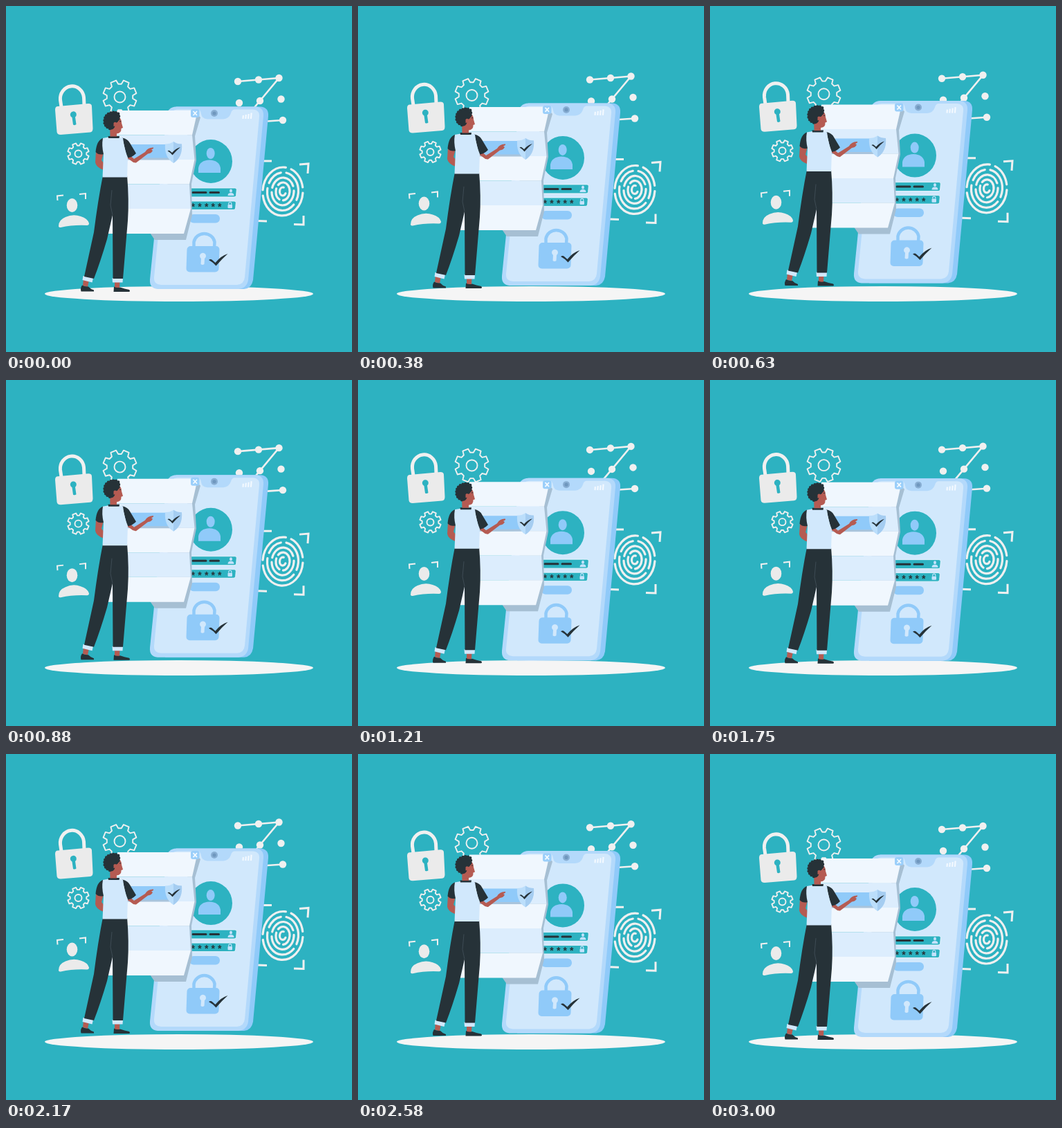
An HTML page that plays this animation: 500x500 px, repeating every 3.04 s.

```html
<!DOCTYPE html>
<html lang="en">
<head>
<meta charset="utf-8">
<title>Phone security</title>
<style>
  html, body { margin: 0; height: 100%; overflow: hidden; background: #2db2c1; }
  svg { display: block; width: 100vw; height: 100vh; }
  .line { fill: none; stroke: #f0f0f0; }
  .pale { fill: #d1e8fc; }
  .blue { fill: #90caf9; }
  .teal { fill: #2db2c1; }
  .dark { fill: #263238; }
  .skin { fill: #b55b52; }
</style>
</head>
<body>
<svg viewBox="0 0 500 500">
  <ellipse cx="250" cy="416" rx="194" ry="11" fill="#f5f5f5"/>

  <g id="icons" fill="#ebebeb">
    <!-- padlock -->
    <path class="line" stroke="#ebebeb" stroke-width="5" d="M80 146L78.500 136A17 18 0 0 1 112.500 132L113 143"/>
    <path d="M75 145L119 141q5 0 5 4L125.500 177q0 5-4 5.500L79 186q-5 0-5.500-4L71 150q0-5 4-5z"/>
    <path class="teal" d="M95.500 161a4.500 4.500 0 1 1 4.500-.5l1.500 10.500q-2 2-4.500.5z"/>
    <!-- gears -->
    <g id="gears" class="line" stroke-width="1.900" stroke-linejoin="round"></g>
    <!-- face scan -->
    <ellipse cx="95.500" cy="288" rx="7.800" ry="10"/>
    <path d="M76 318q0-9 10-13q11-5 22-1q10 3 12 10q0 3-3 3q-20-1-38 3q-3 0-3-2z"/>
    <path class="line" stroke-width="2" d="M74.500 281L74 274.500L83 273.500M106 272L115 271V279"/>
    <!-- network -->
    <path class="line" stroke-width="2.600" d="M335 109L365 106.500L394.500 104L367 137L340 169M400 165L370 167"/>
    <g id="nodes" fill="#f0f0f0"></g>
    <!-- fingerprint -->
    <g id="print" class="line" stroke-width="3.200" stroke-linecap="round" transform="rotate(4 400 268)"></g>
    <path class="line" stroke-width="3" d="M372 224H384M424 229L437 228L436 242M430 303V316L416 315.500M364 310.500L377 311"/>
  </g>

  <g id="front">
    <!-- phone -->
    <path class="blue" d="M246 145.500H367Q380 146 379 159L357 396Q355 408 344 409H230Z"/>
    <path fill="#b3d9fb" d="M246 145.500H360Q373 146 372 159L350 396Q348 408 336 409H219Q207 408 208 395L232 158Q234 146 246 145.500Z"/>
    <path class="pale" d="M248 149.500H278Q281 150 282 156Q283 163 291 163.500H314Q322 163 325 155Q326 150 330 149.500H356Q367 150 366 160L345 392Q344 402 334 403H224Q213 402 214 392L237 160Q238 150 248 149.500Z"/>
    <circle cx="301" cy="155" r="5" fill="#88aed3"/>
    <circle cx="301" cy="155" r="2.600" fill="#6f97be"/>
    <path stroke="#f3f9ff" stroke-width="2.200" d="M342.500 163l.4-5M346.300 163l.5-6M350.100 163l.6-7M353.900 163l.7-8.500"/>

    <ellipse class="teal" cx="296" cy="224.500" rx="31" ry="31.500"/>
    <g class="blue">
      <ellipse cx="295.700" cy="213" rx="6" ry="8"/>
      <path d="M278 241v-7q2-11 16-11.500q14 .5 16 11.500v7z"/>
      <rect x="265" y="301" width="44" height="12.500" rx="6"/>
      <rect x="261" y="347" width="47" height="37.500" rx="5" transform="skewX(-2)" transform-origin="284 366"/>
    </g>
    <path fill="none" stroke="#90caf9" stroke-width="4.500" d="M271.500 349V341A15.300 15 0 0 1 301.500 341L301 349"/>
    <path class="pale" d="M282 365a4.500 4.500 0 1 1 5 0l-.5 8q-2.500 2-5 0z"/>
    <path class="dark" d="M293 367q3-2 5 0l4.500 4q8-10 18-13q-9 8-17 17.500q-4-5-10.500-8.500z"/>

    <g stroke="#eef7ff" stroke-width=".9" class="teal">
      <path d="M262 263H331q2.500 0 2.300 2.500l-.6 8q-.2 2.500-2.700 2.500H262z"/>
      <path d="M261 282H330q2.500 0 2.300 2.500l-.6 7.500q-.2 2.500-2.700 2.500H261z"/>
    </g>
    <path stroke="#263238" stroke-width="3" stroke-linecap="round" d="M270 269.500H289M295 269.500H307.500"/>
    <text class="dark" x="267.500 277.200 286.900 296.500 306" y="295" font-family="Liberation Sans, Arial, sans-serif" font-size="14" font-weight="700">*****</text>
    <g fill="#c4e2fc">
      <ellipse cx="325" cy="267" rx="2" ry="2.500"/>
      <path d="M320.500 274q0-4 4.500-4t4.500 4z"/>
      <rect x="320.500" y="287" width="6.500" height="5.200" rx="1"/>
      <path fill="none" stroke="#c4e2fc" stroke-width="1.200" d="M321.800 287v-1.500a2 2 0 0 1 4 0V287"/>
    </g>

    <!-- folded sheet -->
    <path fill="#a6bfd3" d="M275 155L281 161L273 188L275 223L268 257L269 302L260 338H215L206 325Z"/>
    <g id="sheet"></g>
    <path fill="#a9c4dc" d="M172 203H238V222.500H172z"/>
    <path class="blue" d="M172 200H240V219.500H172z"/>
    <path fill="#bbdefb" d="M242 196q-5 3.500-12 3.500q-1.500 19 12 27.500q13.500-8.500 12-27.500q-7 0-12-3.500z"/>
    <path fill="#a5cdf1" d="M242 196q5 3.500 12 3.500q1.500 19-12 27.500z"/>
    <path class="dark" d="M233.500 209.500q2-1.500 3.500 0l3 2.500q5-6 12-8q-6 5-11.500 11.500q-3-4-7-6z"/>
    <rect x="267" y="149" width="12.500" height="12" rx="3" fill="#9bcffa"/>
    <path stroke="#f5fbff" stroke-width="1.700" d="M270.500 152l5.500 6M276 152l-5.500 6"/>

    <!-- man -->
    <path class="skin" d="M130 210L129 226Q130 233 141 237L142 228L138 223L141 212Z"/>
    <path class="skin" d="M112 394L120 396L118 406L111 404ZM157 397H164.500L164 408H157Z"/>
    <path class="dark" d="M110 403.500Q114 406 119 405.500Q122 409 127 410.500V412.500H108.500Q107 408 110 403.500ZM156 405.500Q160 408 165 406.500Q171 408.500 178 410Q180 412 178 413H155.500Z"/>
    <path class="pale" d="M111.500 390L126 393L124.500 399.500L110.500 396ZM153.500 393H169L168.500 399.500H154Z"/>
    <path class="dark" d="M140 245H175Q178 280 176 310L169 394H154.500L154 302L146 337Q136 371 127 394L113 391L127 327Q133 280 140 245Z"/>
    <path fill="none" stroke="#485661" stroke-width=".7" d="M154 302L151 288L153 266"/>
    <path class="skin" d="M176 213L185 221L201 211Q205 204 213 204.500Q214 206 210 207.500L212 209Q210 213 205 213.500L188 226.500Q184 227 180 223L171 217Z"/>
    <path class="dark" d="M140 191Q131 194 129.500 211Q134 216 141 214ZM168 190.500Q176 192 179 198L188 213Q182 219 175 219.500Z"/>
    <path class="pale" d="M140 191L148 189.500H164L169 191Q171 207 176 219L175 247.500H139.500L141 214Q138 202 140 191Z"/>
    <path class="dark" d="M147.500 188H164L163.500 191H148Z"/>
    <path class="skin" d="M150 170L164 161Q167 164 167 169L169 176L166.500 177Q167 184 160 184.500V188.500H150.500Z"/>
    <path class="dark" d="M144 159Q149 153 157 153.500Q164 155 164 164L161 168L158 169L157 175Q154 180 150 178Q143 176 142 168Z"/>
    <path fill="none" stroke="#263238" stroke-width="4.500" stroke-linecap="round" stroke-dasharray="0 3.700" d="M150 177Q143 174 142.500 168Q142 159 149 155.500Q157 152 162.500 156Q164 161 161 166"/>
    <path class="skin" d="M155.500 169q3-2.500 4 .5q0 4-4 4.500z"/>
    <path stroke="#263238" stroke-width="1" d="M164 167l2-.5"/>
  </g>
</svg>
<script>
const $ = id => document.getElementById(id);
const TAU = Math.PI * 2, LOOP = 3040;

function gear(cx, cy, r, hole) {
  const shape = [[-.27, .77], [-.17, 1], [.17, 1], [.27, .77]];
  const points = [];
  for (let i = 0; i < 8; i++)
    for (const [turn, size] of shape) {
      const a = (i + .5) * TAU / 8 + turn;
      points.push((cx + r * size * Math.cos(a)).toFixed(1) + ',' + (cy + r * size * Math.sin(a)).toFixed(1));
    }
  return `<polygon points="${points.join(' ')}"/><circle cx="${cx}" cy="${cy}" r="${hole}"/>`;
}
$('gears').innerHTML = gear(164.5, 131.5, 24.5, 8) + gear(104.5, 213.5, 15.5, 5);

$('nodes').innerHTML = [[335, 109], [365, 106.5], [394.5, 104], [397.5, 134.5], [367, 137], [337, 140], [400, 165]]
  .map(([x, y]) => `<circle cx="${x}" cy="${y}" r="5.2"/>`).join('');

// each ridge is an ellipse broken by gaps
const ridges = [[29, 35, '46 4 26 4 16 4'], [22.5, 27.5, '30 5 40 5 15 5'], [16, 20, '38 6 50 6'], [10, 13, '24 8 60 8'], [4.5, 6, '70 30']];
$('print').innerHTML = ridges.map(([rx, ry, dash], i) =>
  `<ellipse cx="400" cy="268" rx="${rx}" ry="${ry}" pathLength="100" stroke-dasharray="${dash}" stroke-dashoffset="${i * 23}"/>`).join('');

const folds = [[161, 277, 151], [159, 269, 186.5], [156, 272.5, 222], [153, 265, 257.5], [150, 267, 293], [147, 257, 329]];
$('sheet').innerHTML = folds.slice(1).map(([l, r, y], i) => {
  const [l0, r0, y0] = folds[i];
  return `<path fill="${i % 2 ? '#dcedfd' : '#f0f7fe'}" d="M${l0} ${y0}H${r0}L${r} ${y}H${l}Z"/>`;
}).join('');

// linear rise and fall of 10 px
function float(id, t, period) {
  const p = t % period / period;
  $(id).setAttribute('transform', `translate(0 ${-10 * (1 - Math.abs(1 - 2 * p))})`);
}

function draw(now) {
  const t = Math.min(now % LOOP, 3000);
  float('icons', t, 3000);
  float('front', t, 1500);
  requestAnimationFrame(draw);
}
draw(performance.now());
</script>
</body>
</html>
```
